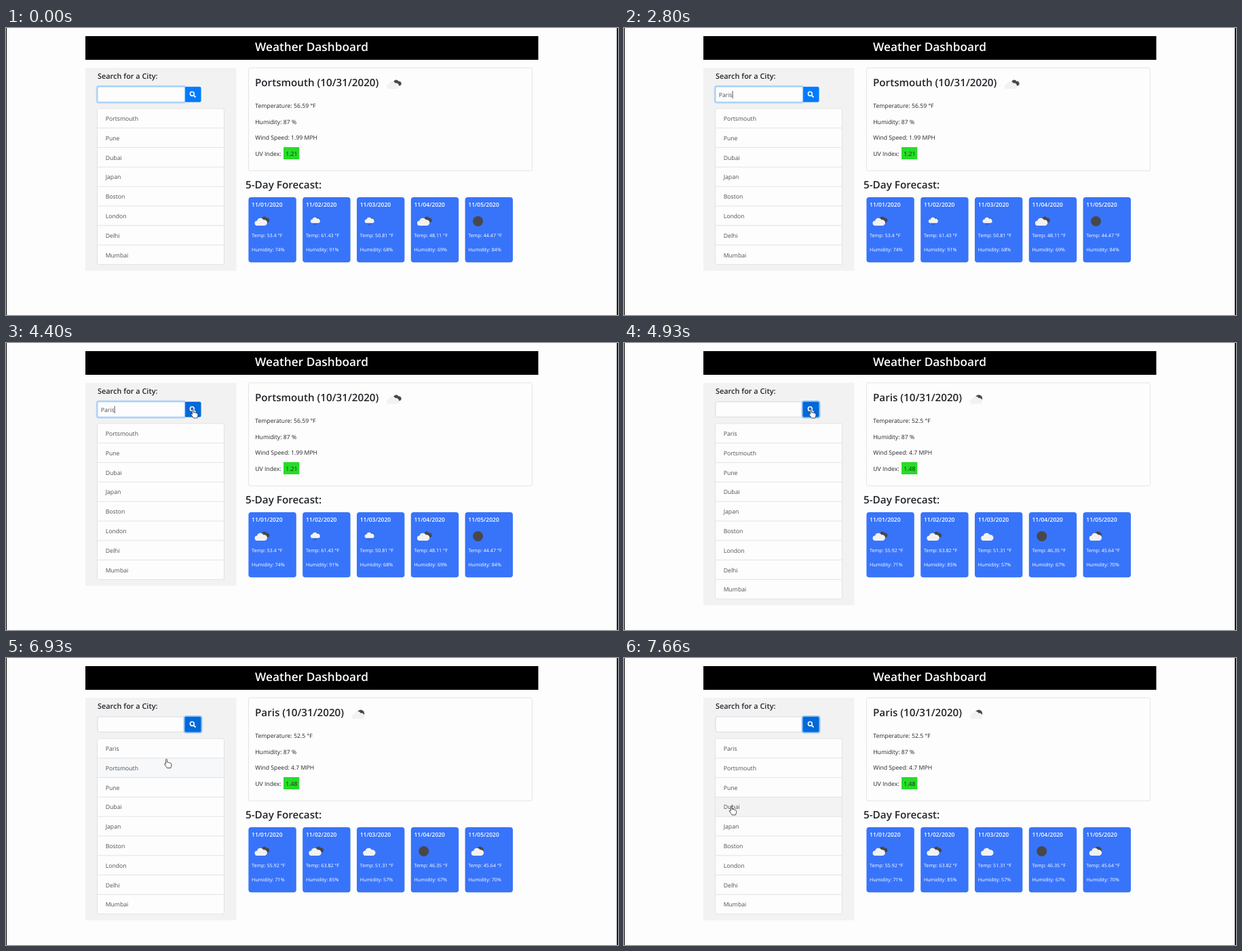
Write an HTML page that moves like this. It is 902 by 424 pixels and loops after 8000 ms.

```html
<!DOCTYPE html>
<html lang="en">
<head>
<meta charset="utf-8">
<title>Weather Dashboard</title>
<style>
html, body { margin: 0; width: 100%; height: 100%; overflow: hidden; background: #fdfdfd; }
svg { display: block; width: 902px; height: 424px; font-family: "Open Sans", "Noto Sans", sans-serif; text-rendering: geometricPrecision; }
</style>
</head>
<body>
<svg id="stage" viewBox="0 0 902 424"></svg>
<script>
const stage = document.getElementById('stage');
const LOOP = 8000, FPS = 15;
const PAGE = '#fdfdfd', INK = '#212529', GREY = '#495057', LINE = '#dedede', DARK = '#48484a';
const LIST = { x: 134.5, y: 119, w: 187, h: 28.8 };

const cities = ['Portsmouth', 'Pune', 'Dubai', 'Japan', 'Boston', 'London', 'Delhi', 'Mumbai'];
const reports = [
  { city: 'Portsmouth', icon: 'clouds', iconX: 561, temp: '56.59', wind: '1.99', uv: '1.21', days: [
    ['clouds', '53.4', 74], ['rain', '61.43', 91], ['rain', '50.81', 68], ['clouds', '48.11', 69], ['clear', '44.47', 84]] },
  { city: 'Paris', icon: 'few', iconX: 510, temp: '52.5', wind: '4.7', uv: '1.48', days: [
    ['clouds', '55.92', 71], ['clouds', '63.82', 85], ['cloud', '51.31', 57], ['clear', '46.35', 67], ['few', '45.64', 70]] }
];

// Event times in ms
const keyTimes = [800, 1200, 2060, 2330, 2800];
const caretOn = [[530, 1800], [2060, 3330], [3860, 4460]];
const CLICK = 4600, CURRENT = 4730, FORECAST = 4860;

const text = (x, y, s, size, fill = INK, weight = 400, extra = '') =>
  `<text x="${x}" y="${y}" font-size="${size}" fill="${fill}" font-weight="${weight}" ${extra}>${s}</text>`;
const rect = (x, y, w, h, fill, r = 0, stroke = 'none', width = 1) =>
  `<rect x="${x}" y="${y}" width="${w}" height="${h}" rx="${r}" fill="${fill}" stroke="${stroke}" stroke-width="${width}"/>`;
const disc = (x, y, r) => `<circle cx="${x}" cy="${y}" r="${r}" fill="${DARK}"/>`;
const cloud = (x, y, k, fill) =>
  `<path transform="translate(${x} ${y}) scale(${k})" fill="${fill}" d="M3.6 0a3.6 3.6 0 0 1-.3-7.2a5.2 5.2 0 0 1 9.6-1.4a4.3 4.3 0 0 1 1.9 8.6z"/>`;

const white = cloud(0, 0, 1, '#f2f2f2');
const icons = {
  cloud: white,
  clear: disc(9.7, -6.5, 7.5),
  few: disc(12.8, -8, 5.4) + white,
  clouds: cloud(7.4, -4.6, .78, DARK) + white,
  rain: cloud(7, -6, .53, DARK) + cloud(2.5, -3.8, .76, '#f2f2f2') +
    `<path d="M7-3.4l-.6 1.6M9.6-3.4l-1 3.2M12-3.4l-.6 1.6" stroke="${DARK}" stroke-width=".9"/>`
};
const icon = (name, x, y) => `<g transform="translate(${x} ${y})">${icons[name]}</g>`;

const pointers = {
  hand: 'M-1 .8a1 1 0 0 1 2 0V4.5l1.9.3 1.9.5 1.6.6q1 .4 1 1.5v2l-1 3.5h-5.5q-1-2-3.6-5q-.5-1.2.6-1.5l1.1.9z',
  arrow: 'M0 0v9.5l2.2-2 1.5 3.2 1.5-.7-1.5-3.1h3z',
  beam: 'M-2-5h4M0-5v10M-2 5h4'
};

function pointerAt(t) {
  const glide = (t0, t1, x0, y0, x1, y1, ease) => {
    const e = ease(Math.min(1, Math.max(0, (t - t0) / (t1 - t0))));
    return { x: x0 + (x1 - x0) * e, y: y0 + (y1 - y0) * e };
  };
  const speedUp = u => 1 - Math.cos(u * Math.PI / 2);
  const slowDown = u => Math.sin(u * Math.PI / 2);
  if (t < 3660) return null;
  if (t < 6460) return glide(4060, 4400, 225, 98, 275.5, 98, slowDown);
  if (t < 6930) return glide(6460, 6933, 275.5, 98, 236.5, 149.5, speedUp);
  return glide(6933, 7660, 236.5, 149.5, 157.5, 219.5, slowDown);
}

const inside = (p, x, y, w, h) => p && p.x >= x && p.x < x + w && p.y >= y && p.y < y + h;

function searchBox(t, overButton) {
  const clicked = t >= CLICK;
  const glass = '<g fill="none" stroke="#fff" stroke-width="1.6"><circle cx="274.3" cy="97.2" r="2.9"/><path d="M276.4 99.3l3.1 3.1" stroke-width="1.9"/></g>';
  const button = rect(263.5, 86.8, 24, 22.6, clicked || overButton ? '#0069d9' : '#007bff', 2.2);
  const field = rect(134.9, 86.9, 128.8, 22.4, PAGE, 2.2, clicked ? '#ced4da' : '#80bdff', .8);
  if (clicked) return field + rect(262.6, 85.9, 25.8, 24.4, 'none', 3, '#8dc1fb', 1.9) + button + glass;
  const typed = 'Paris'.slice(0, keyTimes.filter(k => t >= k).length);
  return button + glass + rect(133.7, 85.7, 131.2, 24.8, 'none', 3, 'rgba(0,123,255,.25)', 1.9) + field +
    text(139.8, 101.8, typed, 8.7, GREY, 400, 'id="typed"') +
    (caretOn.some(([a, b]) => t >= a && t < b) ? '<path id="caret" d="M0 93v11" stroke="#333" stroke-width=".8"/>' : '');
}

function cityList(names, t, p) {
  const { x, y, w, h } = LIST;
  return rect(x, y, w, h * names.length, PAGE, 2.4) + names.map((name, i) => {
    const top = y + i * h;
    const hover = inside(p, x, top, w, h) ? rect(x, top, w, h, t >= 7600 ? '#f3f3f4' : '#f7f8f9') : '';
    const rule = i ? `<path d="M${x} ${top}h${w}" stroke="${LINE}" stroke-width=".8"/>` : '';
    return hover + rule + text(146.7, top + 18, name, 8.7, GREY);
  }).join('') + rect(x, y, w, h * names.length, 'none', 2.4, LINE, .8);
}

function currentWeather(now, uv) {
  return rect(357.5, 58.8, 418, 152.2, PAGE, 2.4, LINE, .8) +
    text(367, 86.3, `${now.city} (10/31/2020)`, 15.2, INK, 600) + icon(now.icon, now.iconX, 90) +
    [`Temperature: ${now.temp} °F`, 'Humidity: 87 %', `Wind Speed: ${now.wind} MPH`, 'UV Index:']
      .map((s, i) => text(367.2, 118.2 + i * 23.5, s, 8.7)).join('') +
    rect(409, 176, 23.3, 18, '#27dc27') + text(412.3, 188.7, uv, 8.7);
}

function forecast(days) {
  return text(353, 237, '5-Day Forecast:', 15.25, INK, 600) + days.map(([name, temp, humidity], i) => {
    const x = 357.4 + i * 79.8;
    return rect(x, 250, 70.4, 96.2, '#3874fa', 4) +
      text(x + 4.7, 263.7, `11/0${i + 1}/2020`, 8.5, '#fff', 600) + icon(name, x + 9.3, 292) +
      text(x + 4.7, 309, `Temp: ${temp} °F`, 7.2, '#fff') +
      text(x + 4.7, 329.6, `Humidity: ${humidity}%`, 7.2, '#fff');
  }).join('');
}

function render(t) {
  const p = pointerAt(t);
  const overButton = inside(p, 263.5, 86.8, 24, 22.6);
  const names = t >= CLICK ? ['Paris', ...cities] : cities;
  const listHeight = LIST.h * names.length;
  const later = reports[+(t >= FORECAST)];

  let cursor = '';
  if (p) {
    const overList = inside(p, LIST.x, LIST.y, LIST.w, listHeight);
    const kind = overButton || overList ? 'hand' : inside(p, 134.5, 86, 129, 24) ? 'beam' : 'arrow';
    cursor = `<path transform="translate(${p.x} ${p.y})" d="${pointers[kind]}" fill="${kind === 'beam' ? 'none' : '#fff'}" stroke="#222" stroke-width=".8" stroke-linejoin="round"/>`;
  }

  stage.innerHTML = rect(0, 0, 902, 424, PAGE) + rect(0, 0, 1, 424, '#000') + rect(900.3, 0, 1.7, 424, '#000') +
    rect(117, 12, 667.5, 35, '#000') +
    text(450.5, 34.4, 'Weather Dashboard', 17.3, '#fff', 600, 'text-anchor="middle"') +
    rect(117, 58.8, 222.3, listHeight + 69.4, '#f2f2f2') +
    text(135, 75, 'Search for a City:', 10.9, INK, 600) +
    searchBox(t, overButton) + cityList(names, t, p) +
    currentWeather(reports[+(t >= CURRENT)], later.uv) + forecast(later.days) + cursor;

  const caret = document.getElementById('caret');
  if (caret) {
    const x = 140.2 + document.getElementById('typed').getComputedTextLength();
    caret.setAttribute('transform', `translate(${x} 0)`);
  }
}

let shown = -1;
function tick() {
  const step = Math.floor((performance.now() % LOOP + 4) * FPS / 1000);
  if (step !== shown) render((shown = step) * 1000 / FPS % LOOP);
  requestAnimationFrame(tick);
}
tick();
</script>
</body>
</html>
```
